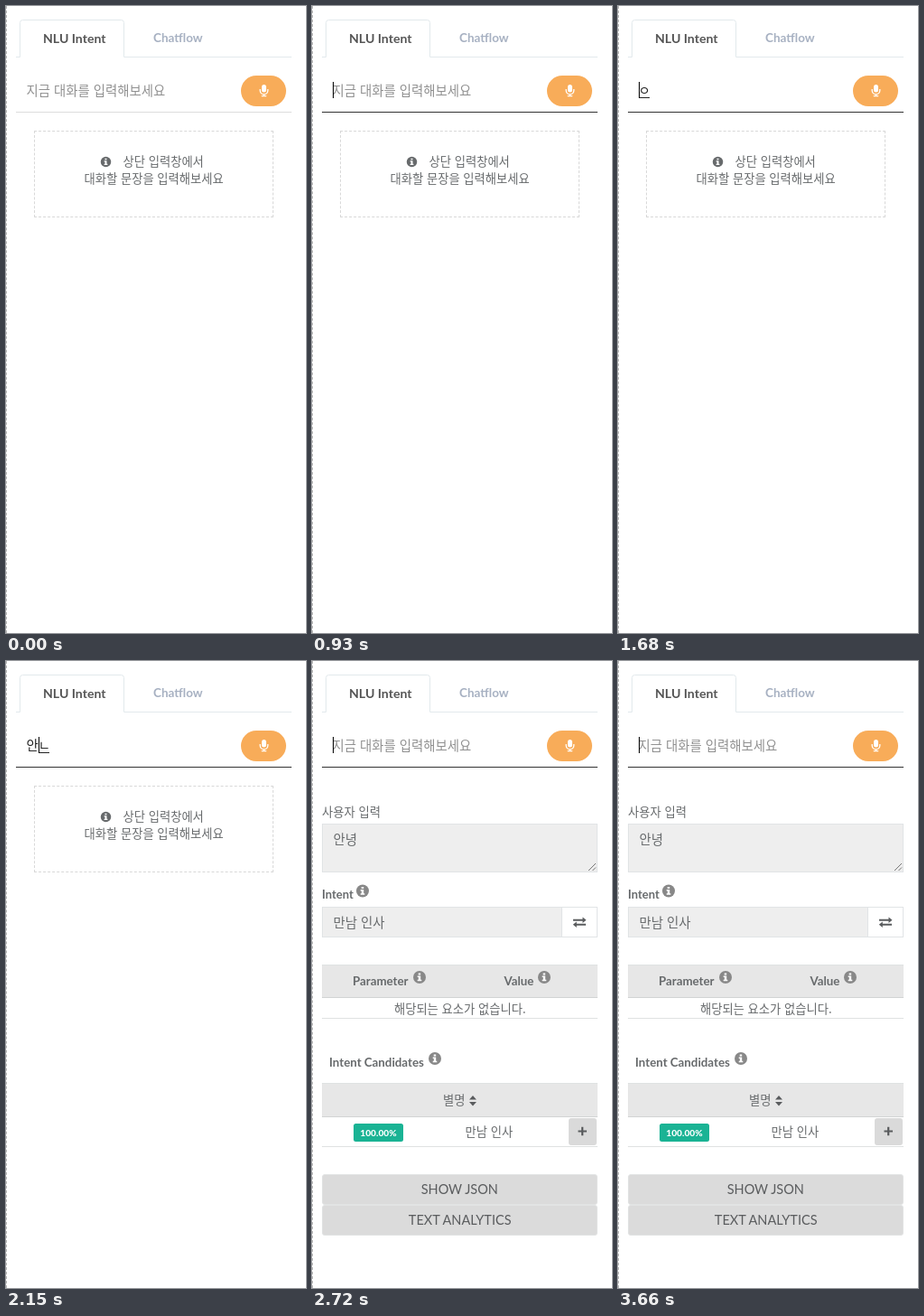
Write an HTML page that moves like this. It is 332 px wide and 694 px high and loops after 4.14 s.

```html
<!DOCTYPE html>
<html lang="ko">
<head>
<meta charset="utf-8">
<title>NLU Intent</title>
<style>
html, body { margin: 0; width: 100%; height: 100%; overflow: hidden; background: #fff; }
body { position: relative; }
div { position: absolute; box-sizing: border-box; }
#edge { left: 0; top: 0; height: 100%; border-left: 1px dashed #b4b4b4; }
#hintBox { left: 31px; top: 138px; width: 265px; height: 96px; border: 1px dashed #d8d8d8; }
svg { position: absolute; left: 0; top: 0; display: block; }
text { font: 13.3px Lato, "Noto Sans CJK KR", "Noto Sans CJK", sans-serif; fill: #676a6c; white-space: pre; }
.ko { font-family: "Noto Sans CJK KR", "Noto Sans CJK", sans-serif; font-weight: 350; }
.label { font-weight: 500; }
.field { font-size: 14.4px; }
.bold { font-weight: 700; }
.mid { text-anchor: middle; }
.button { font-size: 14.5px; text-anchor: middle; fill: #5a5c5e; }
.icon { fill: #888; }
.frame { fill: #eee; stroke: #e1e4e6; }
.head { fill: #e7e7e7; }
.rule { stroke: #dfe2e2; }
</style>
</head>
<body>
<div id="edge"></div>
<div id="hintBox"></div>
<svg width="332" height="694" viewBox="0 0 332 694">
  <defs>
    <g id="info">
      <circle r="7"/>
      <path fill="#fff" d="M-1.3-4.6H1.2V-2.6H-1.3ZM-2.3-1.5H1.2V2.7H2.3V4.3H-2.3V2.7H-1.2V.1H-2.3Z"/>
    </g>
  </defs>

  <!-- tabs -->
  <path fill="none" stroke="#e2e9ec" d="M11 56.5H15.5V18.5a3 3 0 0 1 3-3H127.5a3 3 0 0 1 3 3V56.5H316"/>
  <text class="bold" x="41" y="41" style="font-size:14.1px;fill:#555">NLU Intent</text>
  <text class="bold" x="163" y="40" style="font-size:13.5px;fill:#a7b1c2">Chatflow</text>

  <!-- input row -->
  <text id="placeholder" class="ko field" x="22.5" y="98.5" style="fill:#909090">지금 대화를 입력해보세요</text>
  <text id="typed" class="ko field" x="22.5" y="98.5" style="fill:#222"></text>
  <rect id="composing" y="101" width="12" height="1" fill="#222"/>
  <rect id="caret" y="84" width="1" height="18" fill="#000"/>
  <rect id="inputLine" x="11" y="117" width="305" height="1"/>
  <rect x="260" y="77" width="50" height="34" rx="17" fill="#f8ac59"/>
  <g fill="none" stroke="#fff" stroke-width="1.3">
    <rect x="283" y="87" width="5" height="8.5" rx="2.5" fill="#fff" stroke="none"/>
    <path d="M281.2 92v1.5a4.3 4.3 0 0 0 8.6 0V92M285.5 97.8V99.5M282.8 99.6H288.2"/>
  </g>

  <g id="hint">
    <use href="#info" transform="translate(110.5 172.5) scale(.82)" fill="#676a6c"/>
    <text class="ko" x="129.5" y="177.4">상단 입력창에서</text>
    <text class="ko" x="86.5" y="195.5">대화할 문장을 입력해보세요</text>
  </g>

  <g id="result">
    <text class="ko label" x="11" y="171.8">사용자 입력</text>
    <rect class="frame" x="11.5" y="180.5" width="304" height="53"/>
    <path stroke="#777" d="M306 232l8-8M310.5 232l3.5-3.5"/>
    <text class="ko field" x="23.5" y="203">안녕</text>

    <text class="bold" x="11" y="263" style="font-size:13px">Intent</text>
    <use class="icon" href="#info" x="56" y="254.5"/>
    <rect class="frame" x="11.5" y="272.5" width="265" height="33"/>
    <rect class="frame" x="276.5" y="272.5" width="39" height="33" style="fill:#fff"/>
    <text class="ko field" x="23.5" y="294.8">만남 인사</text>
    <path fill="#5a5c5e" d="M289 285.8H299.5V283.6L303.5 286.8L299.5 290V287.8H289ZM303 290.8H292.8V288.6L288.8 291.8L292.8 295V292.8H303Z"/>

    <rect class="head" x="11" y="336" width="305" height="36"/>
    <path class="rule" d="M11 336.5H316M11 395.5H316"/>
    <path stroke="#d2d4d4" d="M11 372.5H316"/>
    <text class="bold" x="45" y="359">Parameter</text>
    <use class="icon" href="#info" x="119" y="350"/>
    <text class="bold" x="212.5" y="359">Value</text>
    <use class="icon" href="#info" x="257" y="350"/>
    <text class="ko mid" x="163.8" y="389.5">해당되는 요소가 없습니다.</text>

    <text class="bold" x="19" y="449">Intent Candidates</text>
    <use class="icon" href="#info" x="136" y="440"/>
    <rect class="head" x="11" y="467" width="305" height="37"/>
    <path class="rule" d="M11 467.5H316M11 537.5H316"/>
    <path stroke="#d2d4d4" d="M11 504.5H316"/>
    <text class="ko label" x="145" y="491.2">별명</text>
    <path fill="#5a5c5e" d="M174 485.5L178 481L182 485.5ZM174 488L178 492.5L182 488Z"/>
    <rect x="46" y="512" width="55" height="20" rx="2.5" fill="#1ab394"/>
    <text class="mid" x="73.5" y="525.7" style="font-size:10.2px;font-weight:800;fill:#fff">100.00%</text>
    <text class="ko" x="169.5" y="526.3">만남 인사</text>
    <rect x="284" y="506" width="31" height="30" rx="3" fill="#dadada"/>
    <path stroke="#5a5c5e" stroke-width="2.2" d="M294.5 520.5H304M299.2 515.8V525.2"/>

    <g fill="#dbdbdb" stroke="#e2e4e4">
      <rect x="11.5" y="568.5" width="304" height="33" rx="2.5"/>
      <rect x="11.5" y="602.5" width="304" height="33" rx="2.5"/>
    </g>
    <text class="button" x="163.3" y="590">SHOW JSON</text>
    <text class="button" x="163.7" y="624">TEXT ANALYTICS</text>
  </g>
</svg>
<script>
const LOOP = 4140, RESULT_AT = 2720;
const TEXT_X = 23, CHAR_WIDTH = 13;

// caret: character position, or null while hidden
const steps = [
  { at: 0, text: '', caret: null },
  { at: 750, text: '', caret: 0 },
  { at: 1310, text: '', caret: null },
  { at: 1680, text: 'ㅇ', caret: 0 },
  { at: 1780, text: '아', caret: 0 },
  { at: 1970, text: '안', caret: 0 },
  { at: 2150, text: '안ㄴ', caret: 1 },
  { at: 2245, text: '안녀', caret: 1 },
  { at: 2340, text: '안녕', caret: 1 },
  { at: 2530, text: '안녕', caret: 2 },
  { at: RESULT_AT, text: '', caret: 0 },
  { at: 3190, text: '', caret: null },
  { at: 3660, text: '', caret: 0 },
];
const lineShades = [[0, '#ddd'], [750, '#b4b4b4'], [840, '#6c6c6c'], [930, '#333']];

const el = id => document.getElementById(id);
const show = (id, visible) => { el(id).style.visibility = visible ? 'visible' : 'hidden'; };

function render(t) {
  const { text, caret } = steps.findLast(step => step.at <= t);
  const caretX = TEXT_X + CHAR_WIDTH * (caret ?? 0);
  el('typed').textContent = text;
  el('caret').setAttribute('x', caretX);
  el('composing').setAttribute('x', caretX);
  el('inputLine').setAttribute('fill', lineShades.findLast(([at]) => at <= t)[1]);
  show('placeholder', !text);
  show('caret', caret !== null);
  show('composing', caret !== null && caret < text.length);
  const done = t >= RESULT_AT;
  show('result', done);
  show('hint', !done);
  show('hintBox', !done);
}

const start = performance.now();
function tick() {
  render((performance.now() - start) % LOOP);
  requestAnimationFrame(tick);
}
tick();
</script>
</body>
</html>
```
